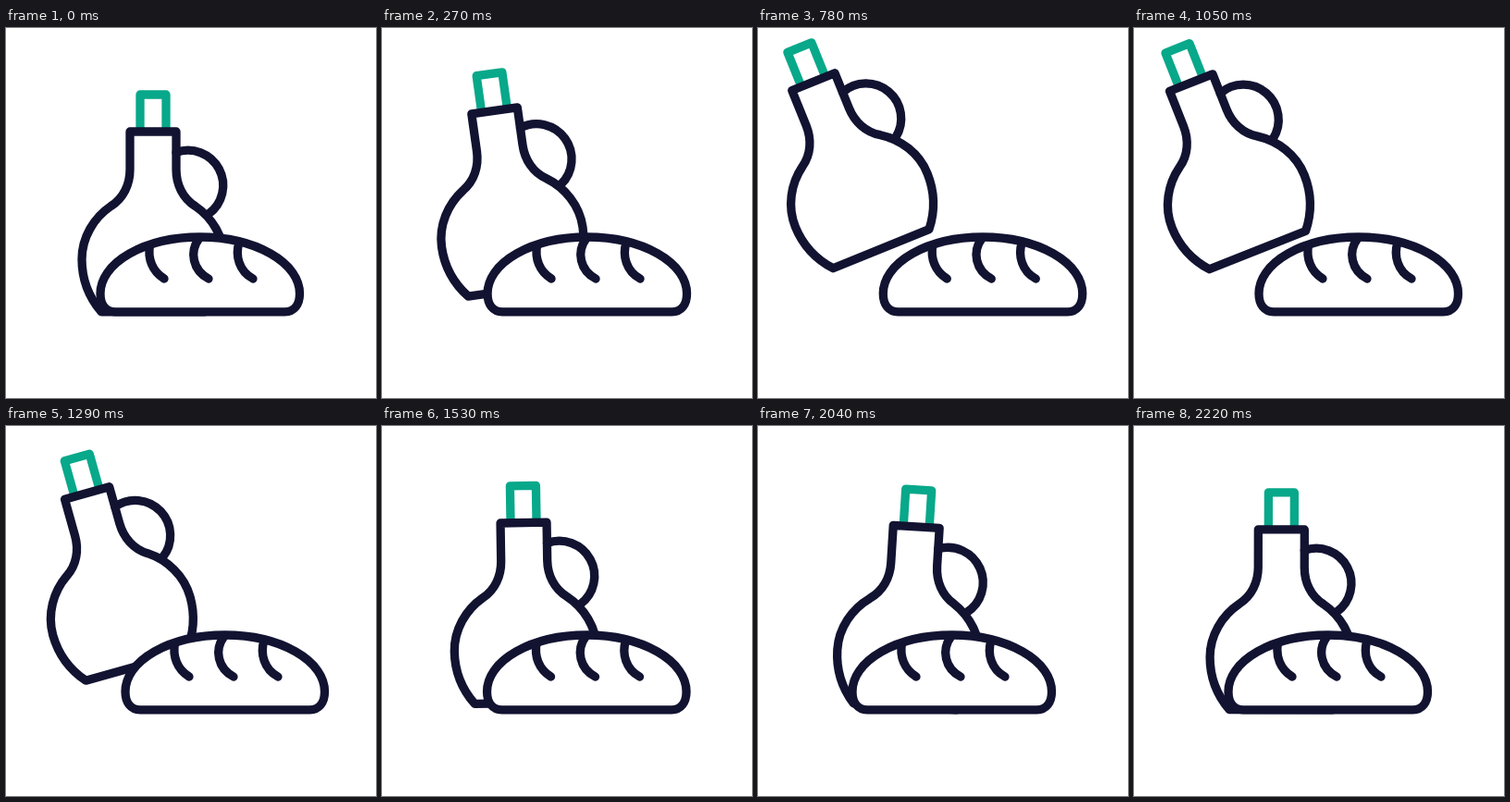
An HTML page that plays this animation: 400 px wide and 400 px high, repeating every 2.25 s.

```html
<!DOCTYPE html>
<html lang="en">
<head>
<meta charset="utf-8">
<title>Bottle and bread</title>
<style>
  html, body { margin: 0; width: 100%; height: 100%; overflow: hidden; background: #fff; }
  svg { display: block; width: 100%; height: 100%; }
</style>
</head>
<body>
<svg viewBox="0 0 400 400" fill="none" stroke="#121331" stroke-width="9.3"
     stroke-linecap="round" stroke-linejoin="round">
  <g id="bottle">
    <path stroke="#08a88a" d="M145 111V72H173V111"/>
    <path d="M184 134.4A38 38 0 0 1 219 201"/>
    <path d="M134 112V153C134 169 127 184 113.5 192.5C95 205 82 226.5 82 250C82 272 90 291.5 103 306.8
             H215C228 291.5 236 272 236 250C236 226.5 223 205 204.5 192.5C191 184 184 169 184 153V112Z"/>
  </g>
  <g id="bread">
    <path fill="#fff" d="M118 306.8H301.5C311.5 306.8 317.5 299 317.5 287A107.75 61 0 0 0 102 287C102 299 108 306.8 118 306.8Z"/>
    <path d="M155.5 235C153 249 158 263 171 271M208.5 228C198 242 202 262 219 271M252 232C247.5 246 252 263 267 271"/>
  </g>
</svg>
<script>
const LOOP = 2250, PEAK = 900, TILT = -22.4, ROCK = 5.8;
const bottle = document.getElementById('bottle');
const bread = document.getElementById('bread');

// Cubic bezier easing with handles (a, 0) and (b, 1), solved by bisection.
function ease(x, a, b) {
  x = Math.min(1, Math.max(0, x));
  let low = 0, high = 1;
  for (let i = 0; i < 24; i++) {
    const s = (low + high) / 2, r = 1 - s;
    if (3 * s * r * (a * r + b * s) + s ** 3 < x) low = s; else high = s;
  }
  return low * low * (3 - 2 * low);
}

function pose(t) {
  if (t < PEAK) {
    const p = ease(t / PEAK, 0.31, 0.35);
    return { lift: p, slide: p, angle: TILT * p };
  }
  const fall = duration => ease((t - PEAK) / duration, 2 / 3, 2 / 3);
  const rock = Math.min(1, Math.max(0, (t - 1740) / 485));
  return {
    lift: 1 - fall(750),
    slide: 1 - fall(900),
    angle: rock > 0 ? ROCK * (1 - rock * rock) : TILT + (ROCK - TILT) * fall(840)
  };
}

function draw() {
  const { lift, slide, angle } = pose(performance.now() % LOOP);
  bottle.setAttribute('transform', `translate(${-30.5 * lift} ${-90.5 * lift}) rotate(${angle} 215 306.8)`);
  bread.setAttribute('transform', `translate(${33.8 * slide} 0)`);
  requestAnimationFrame(draw);
}
draw();
</script>
</body>
</html>
```
